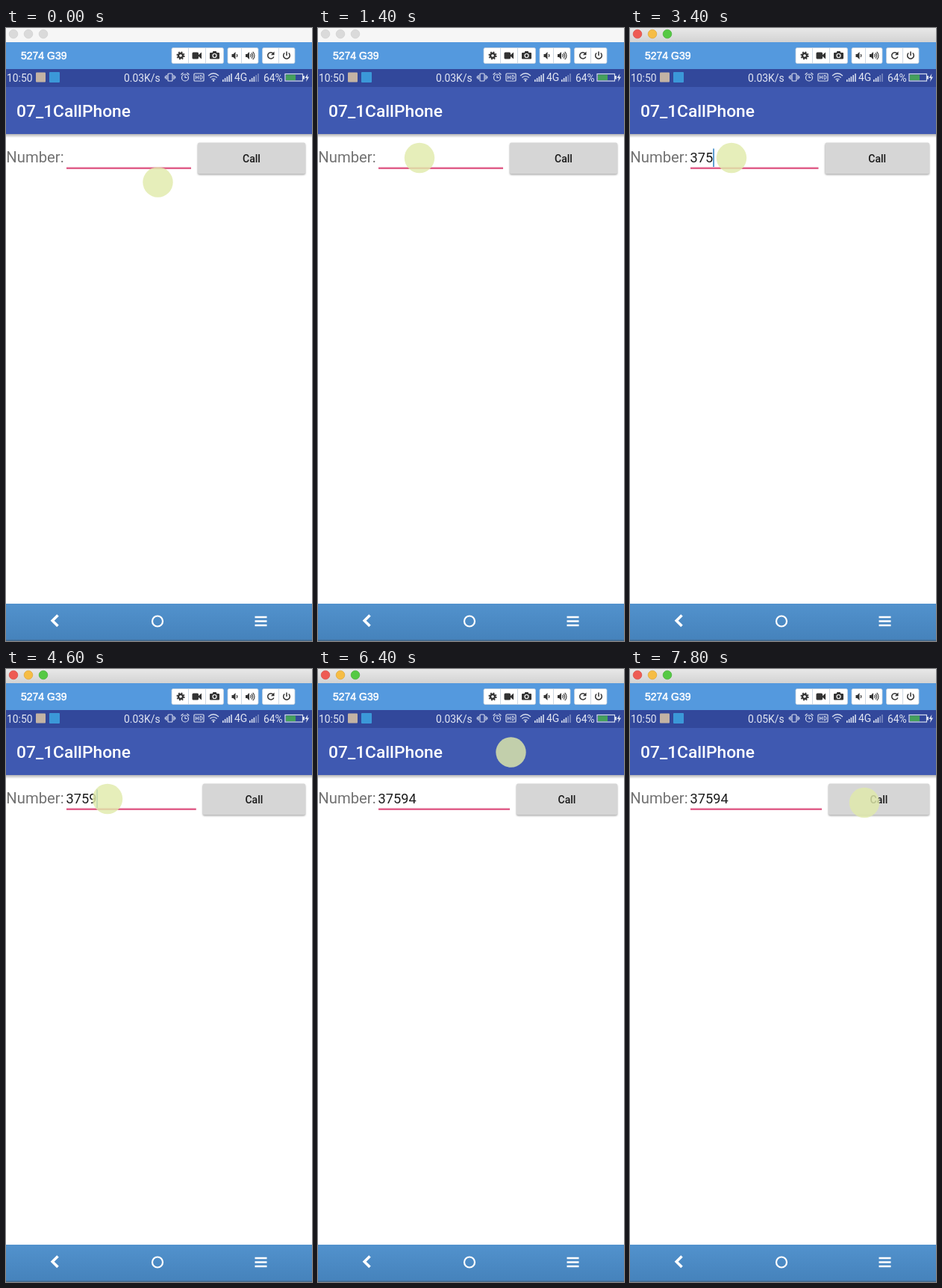
These frames come from a looping animation (410x821 px, 8000 ms). An HTML page:

```html
<!DOCTYPE html>
<html lang="en">
<head>
<meta charset="utf-8">
<title>Call demo</title>
<style>
  html, body { margin: 0; overflow: hidden; background: #fff; }
  svg { display: block; position: fixed; top: 0; left: 0; width: 410px; height: 821px; }
  text { font-family: Roboto, sans-serif; white-space: pre; }
  .line { fill: none; stroke: #333; stroke-width: 1.5; }
  .thin { stroke-width: 1.1; }
  .status { fill: #e3e7f3; font-size: 13.9px; }
  .status-line { fill: none; stroke: #d7deef; stroke-width: 1.2; }
  .device { font: 14px 'Liberation Sans', sans-serif; }
</style>
</head>
<body>
<svg viewBox="0 0 410 821">
  <defs>
    <linearGradient id="titleFill" x2="0" y2="1">
      <stop stop-color="#e8e8e8"/><stop offset="1" stop-color="#d3d3d3"/>
    </linearGradient>
    <linearGradient id="navFill" x2="0" y2="1">
      <stop stop-color="#5292cd"/><stop offset="1" stop-color="#4582bb"/>
    </linearGradient>
    <linearGradient id="barShadow" x2="0" y2="1">
      <stop stop-color="#000" stop-opacity=".3"/><stop offset="1" stop-color="#000" stop-opacity="0"/>
    </linearGradient>
    <filter id="soft"><feGaussianBlur stdDeviation="1"/></filter>
  </defs>

  <!-- window title -->
  <rect id="titleBar" width="410" height="19"/>
  <g id="lights" stroke-width=".7">
    <circle cx="10" cy="8" r="5.8"/><circle cx="30" cy="8" r="5.8"/><circle cx="50" cy="8" r="5.8"/>
  </g>

  <!-- mirror toolbar -->
  <rect y="19" width="410" height="36" fill="#5499de"/>
  <text class="device" x="20" y="42" fill="#fff" stroke="#fff" stroke-width=".5">5274 G39</text>
  <g fill="#fff" stroke="#c2cfdc" stroke-width=".8">
    <rect x="222" y="26.5" width="69.5" height="21" rx="2"/>
    <rect x="297" y="26.5" width="41" height="21" rx="2"/>
    <rect x="343.5" y="26.5" width="43.5" height="21" rx="2"/>
    <path d="M244.5 27v20M267.5 27v20M315.5 27v20M365.5 27v20"/>
  </g>
  <g fill="#333">
    <circle cx="234" cy="37" r="3" fill="none" stroke="#333" stroke-width="2.4"/>
    <circle cx="234" cy="37" r="4.8" fill="none" stroke="#333" stroke-width="1.6" stroke-dasharray="1.9 1.87"/>
    <rect x="249.5" y="32.5" width="8.5" height="9" rx="1.5"/>
    <path d="M258 36l4-3.5v9l-4-3.5z"/>
    <path d="M274 33h2.5l1-2h4l1 2h2.5q1 0 1 1v6.5q0 1-1 1h-11q-1 0-1-1V34q0-1 1-1z"/>
    <circle cx="279.5" cy="37" r="2.5" stroke="#fff" stroke-width="1.2"/>
    <path d="M302.5 35h2l3-3v10l-3-3h-2zM321 35h2l3-3v10l-3-3h-2z"/>
    <path class="line thin" d="M309 35.2q1.8 1.8 0 3.6M327.5 35.2q1.8 1.8 0 3.6M329 33.5q3.3 3.5 0 7M330.7 31.8q4.6 5.2 0 10.4"/>
    <path class="line" d="M358 34a4.2 4.2 0 1 0 .8 4.5"/>
    <path d="M359.5 31.5v4.7h-4.7z"/>
    <path class="line" d="M373.3 33.5a4.3 4.3 0 1 0 5.4 0M376 31.5v5.5"/>
  </g>

  <!-- phone status bar -->
  <rect y="55" width="410" height="24" fill="#32489b"/>
  <text class="status" x="1" y="71.5">10:50</text>
  <rect x="40" y="59.5" width="13" height="13" rx="1" fill="#c3b3a4"/>
  <rect x="58" y="59" width="14" height="14" rx="1" fill="#3b98d8"/>
  <text class="status" id="speed" x="158" y="71.5"></text>
  <g class="status-line">
    <rect x="217" y="61" width="6" height="10" rx="1"/>
    <path d="M215 63v6M213.3 64.5v3M225 63v6M226.7 64.5v3"/>
    <circle cx="240" cy="66.5" r="4.5"/>
    <path d="M240 63.5v3h2.5M234.5 62.5l3-2.5M245.5 62.5l-3-2.5"/>
    <rect x="252" y="61" width="13" height="10" rx="1"/>
    <path d="M254.5 63.5v5M257.5 63.5v5M254.5 66h3M260 63.5h1q2 0 2 2.5t-2 2.5h-1z" stroke-width="1"/>
    <path d="M271 64q7-6.5 14 0M273.3 66.5q4.7-4 9.4 0M275.5 69q2.5-2 5 0"/>
  </g>
  <circle cx="278" cy="70.5" r="1.2" fill="#d7deef"/>
  <g id="signals" fill="#d7deef"></g>
  <text class="status" x="306" y="71">4G</text>
  <text class="status" x="345" y="71.5">64%</text>
  <rect class="status-line" x="374" y="61.5" width="23.5" height="9.5"/>
  <rect x="375" y="62.5" width="13" height="7.5" fill="#45a05c"/>
  <rect x="398" y="64" width="2" height="4.5" fill="#d7deef"/>
  <path d="M404.5 61l-4 6h2.5l-1 5 4-6.5h-2.5z" fill="#e3e7f3"/>

  <!-- app -->
  <rect y="142" width="410" height="5" fill="url(#barShadow)"/>
  <rect y="79" width="410" height="63" fill="#3f59b1"/>
  <text x="14" y="119" fill="#fff" font-size="22.78" font-weight="500">07_1CallPhone</text>
  <text x=".3" y="180" fill="#737373" font-size="20.3">Number:</text>
  <rect id="underline" x="81" y="186.5" height="2.5" fill="#e0608a"/>
  <text id="digits" x="80.5" y="180" fill="#1c1c1c" font-size="18.2"></text>
  <rect id="caret" y="161.5" width="1.8" height="24.5" fill="#4f95cc"/>
  <rect id="buttonShadow" y="155" height="41.5" rx="2" fill="#999" filter="url(#soft)"/>
  <rect id="button" y="153.5" height="42" rx="2" fill="#d6d6d6"/>
  <text id="call" y="180" text-anchor="middle" fill="#1a1a1a" font-size="14" font-weight="500">Call</text>

  <!-- navigation -->
  <rect y="771" width="410" height="50" fill="url(#navFill)"/>
  <rect y="819.5" width="410" height="1.5" fill="#43698c"/>
  <g fill="none" stroke="#fff">
    <path d="M69.5 786.5l-7.3 7.3 7.3 7.3" stroke-width="3.6"/>
    <circle cx="203" cy="794.5" r="7" stroke-width="2.2"/>
    <path d="M333.5 789h16M333.5 794.5h16M333.5 800h16" stroke-width="2.5"/>
  </g>

  <circle id="pointer" r="20.2" fill="#e1eaab" fill-opacity=".81"/>
</svg>

<script>
const LOOP = 8;
const NUMBER = "37594";
const DIGIT_WIDTH = 10.05;

// Each track lists [start in seconds, value]; values hold until the next entry.
const pointerTrack = [
  [0, [203.5, 206.5]], [.4, [186, 196]], [.6, [166, 185]], [.8, [149, 179.5]], [1, [136, 174]],
  [6.2, [203.5, 140]], [6.4, [258.5, 111.5]], [6.6, [283, 150]], [6.8, [303, 176]], [7.2, [314, 179]]
];
const typedTrack = [[0, 0], [2.8, 1], [3, 2], [3.4, 3], [4.6, 4], [5.4, 5]];
const caretTrack = [
  [0, false], [.8, true], [1.4, false], [2.2, true], [4.2, false],
  [4.6, true], [6.2, false], [6.6, true], [7.8, false]
];
const speedTrack = [[0, "0.03K/s"], [7, "0.05K/s"]];
const focusTrack = [[0, false], [2, true]];

const LIGHTS = [["#ee5b53", "#d64a43"], ["#f6bd45", "#dda233"], ["#55c944", "#43ad34"]];
const IDLE_LIGHT = ["#dadada", "#cfcfcf"];

const byId = id => document.getElementById(id);
const valueAt = (track, time) => track.findLast(([start]) => start <= time)[1];

function set(id, attributes) {
  for (const [name, value] of Object.entries(attributes)) byId(id).setAttribute(name, value);
}

function addSignal(x, strongBars) {
  for (let i = 0; i < 5; i++) {
    const height = 3 + i * 2;
    byId("signals").insertAdjacentHTML("beforeend",
      `<rect x="${x + i * 2.8}" y="${72 - height}" width="1.6" height="${height}" opacity="${i < strongBars ? 1 : .45}"/>`);
  }
}

function draw(time) {
  const focused = valueAt(focusTrack, time);
  set("titleBar", { fill: focused ? "url(#titleFill)" : "#f6f6f6" });
  [...byId("lights").children].forEach((light, i) => {
    const [fill, stroke] = focused ? LIGHTS[i] : IDLE_LIGHT;
    light.setAttribute("fill", fill);
    light.setAttribute("stroke", stroke);
  });

  byId("speed").textContent = valueAt(speedTrack, time);

  // The field grows with its text and squeezes the button.
  const count = valueAt(typedTrack, time);
  const fieldRight = 248 + 2.25 * Math.max(0, count - 1);
  const left = fieldRight + 9;
  const width = 401 - left;
  byId("digits").textContent = NUMBER.slice(0, count);
  set("underline", { width: fieldRight - 81 });
  set("buttonShadow", { x: left, width });
  set("button", { x: left, width });
  set("call", { x: left + width / 2 });
  set("caret", { x: 81 + count * DIGIT_WIDTH, opacity: +valueAt(caretTrack, time) });

  const [cx, cy] = valueAt(pointerTrack, time);
  set("pointer", { cx, cy });
}

function tick() {
  draw(performance.now() / 1e3 % LOOP);
  requestAnimationFrame(tick);
}

addSignal(290, 5);
addSignal(326, 3);
tick();
</script>
</body>
</html>
```
